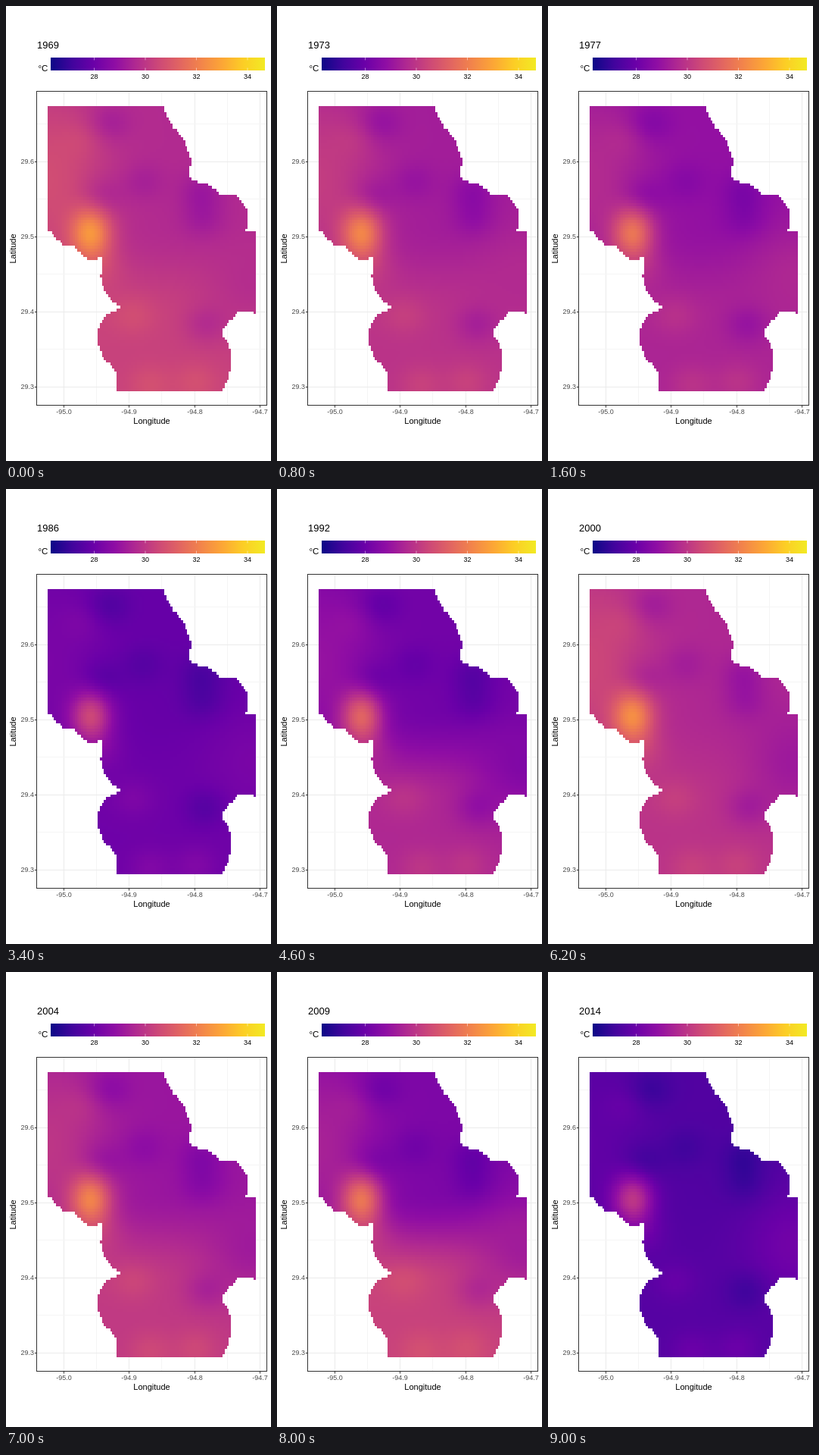
These frames come from a looping animation (350 px wide and 600 px high, 9.2 s). An HTML page with a canvas:

```html
<!DOCTYPE html>
<html>
<head>
<meta charset="utf-8">
<style>
html, body { margin: 0; width: 100%; height: 100%; overflow: hidden; background: #fff; }
canvas { display: block; }
</style>
</head>
<body>
<canvas id="stage" width="350" height="600"></canvas>
<script>
const ctx = document.getElementById('stage').getContext('2d');
const FIRST_YEAR = 1969, YEARS = 46, STEP = 200;
const GRID = 100, MAP = { x: 55, y: 132, w: 275, h: 376 };

const PLASMA = ['0d0887', '41049d', '6a00a8', '8f0da4', 'b12a90', 'cc4778',
  'e16462', 'f2844b', 'fca636', 'fcce25', 'f2ea24']
  .map(hex => [0, 2, 4].map(i => parseInt(hex.slice(i, i + 2), 16)));

const coast = new Path2D(`M55 131H208Q212 150 226 166Q244 188 244 208L241 225 255 233
  270 236 281 247 303 248Q318 262 320 279L317 296H331V405L306 402Q300 412 288 422L285 433
  Q298 450 298 468Q297 488 284 509H146L147 488Q145 478 136 472Q121 458 121 436
  Q122 408 145 402L151 397Q128 386 125 355L126 332 110 335Q101 331 91 317L75 315 55 295Z`);

// Key years: warmth of the north, the east bay and the south
const climate = [
  { year: 1969, north: .40, east: .41, south: .48 },
  { year: 1977, north: .31, east: .39, south: .38 },
  { year: 1986, north: .19, east: .24, south: .21 },
  { year: 1992, north: .22, east: .26, south: .39 },
  { year: 2000, north: .39, east: .34, south: .43 },
  { year: 2009, north: .25, east: .35, south: .48 },
  { year: 2014, north: .14, east: .22, south: .15 }
];

// Lasting warm and cool spots: x, y, strength
const spots = [
  [135, 155, -.06], [103, 175, .03], [180, 232, -.04], [125, 252, -.06],
  [258, 245, -.06], [260, 280, -.05], [128, 345, .04], [168, 408, .04],
  [263, 420, -.06], [190, 500, .05], [250, 497, .05]
];

const lerp = (a, b, f) => a + (b - a) * f;
const gauss = (x, y, cx, cy, rx, ry) =>
  Math.exp(-(((x - cx) / rx) ** 2 + ((y - cy) / ry) ** 2) / 2);
const smoothstep = (a, b, v) => {
  const f = Math.max(0, Math.min(1, (v - a) / (b - a)));
  return f * f * (3 - 2 * f);
};

const cells = [];
for (let i = 0; i < GRID * GRID; i++) {
  const x = MAP.x + (i % GRID + .5) * MAP.w / GRID;
  const y = MAP.y + (Math.floor(i / GRID) + .5) * MAP.h / GRID;
  if (!ctx.isPointInPath(coast, x, y)) continue;
  cells.push({
    i,
    south: smoothstep(290, 410, y),
    west: gauss(x, y, 55, 230, 55, 90),
    east: gauss(x, y, 325, 360, 45, 50),
    hot: gauss(x, y, 112, 300, 19, 24),
    local: spots.reduce((sum, [sx, sy, s]) => sum + s * gauss(x, y, sx, sy, 20, 18), 0)
  });
}

function plasma(v) {
  const p = Math.max(0, Math.min(.9999, v)) * 10, k = Math.floor(p);
  return PLASMA[k].map((c, j) => lerp(c, PLASMA[k + 1][j], p - k));
}

function climateAt(year) {
  const k = Math.max(1, climate.findIndex(c => c.year >= year));
  const a = climate[k - 1], b = climate[k];
  const f = (year - a.year) / (b.year - a.year);
  const mix = key => lerp(a[key], b[key], f);
  return { north: mix('north'), east: mix('east'), south: mix('south') };
}

const field = document.createElement('canvas');
field.width = field.height = GRID;
const fieldCtx = field.getContext('2d');
const image = fieldCtx.createImageData(GRID, GRID);

function drawField(year) {
  const { north, east, south } = climateAt(year);
  const hot = .28 + .3 * (south - north);
  for (const c of cells) {
    const base = lerp(lerp(north, south, c.south), east, c.east);
    const v = base + .25 * south * c.west + hot * c.hot + c.local;
    image.data.set([...plasma(v), 255], c.i * 4);
  }
  fieldCtx.putImageData(image, 0, 0);
  ctx.imageSmoothingEnabled = false;
  ctx.drawImage(field, MAP.x, MAP.y, MAP.w, MAP.h);
}

function text(str, x, y, size, align = 'center', color = '#000') {
  ctx.font = `${size}px "Liberation Sans", Arial, sans-serif`;
  ctx.textAlign = align;
  ctx.fillStyle = color;
  ctx.fillText(str, x, y);
}

function rect(x, y, w, h, color) {
  ctx.fillStyle = color;
  ctx.fillRect(x, y, w, h);
}

function drawLegend() {
  const ramp = ctx.createLinearGradient(59, 0, 342, 0);
  PLASMA.forEach((c, i) => ramp.addColorStop(i / 10, `rgb(${c})`));
  rect(59, 68, 283, 17, ramp);
  text('°C', 42.5, 86, 11.5, 'left');
  for (let i = 0; i < 4; i++) {
    const x = 116.5 + i * 67.5;
    rect(x - .25, 68, .5, 3.4, '#fff');
    rect(x - .25, 81.6, .5, 3.4, '#fff');
    text(28 + 2 * i, x, 96, 9);
  }
}

function drawGrid() {
  for (let i = 0; i < 7; i++) {
    rect(Math.round(76 + i * 43.15), 113, 1, 413, i % 2 ? '#f5f5f5' : '#ebebeb');
  }
  for (let i = 0; i < 8; i++) {
    rect(41, Math.round(155 + i * 49.5), 303, 1, i % 2 ? '#ebebeb' : '#f5f5f5');
  }
}

function drawAxes() {
  ctx.strokeStyle = '#333';
  ctx.strokeRect(40.5, 112.5, 304, 414);
  for (let i = 0; i < 4; i++) {
    const x = Math.round(76 + i * 86.3), y = Math.round(204.5 + i * 99);
    rect(x, 527, 1, 2.5, '#333');
    rect(38, y, 3, 1, '#333');
    text((-95 + i / 10).toFixed(1), x + .5, 538, 9, 'center', '#4d4d4d');
    text((29.6 - i / 10).toFixed(1), 37, y + 3, 9, 'right', '#4d4d4d');
  }
  text('Longitude', 192.5, 551, 11);
  ctx.save();
  ctx.translate(13, 320);
  ctx.rotate(-Math.PI / 2);
  text('Latitude', 0, 0, 11);
  ctx.restore();
}

let shown;
function frame() {
  const year = FIRST_YEAR + Math.floor(performance.now() / STEP) % YEARS;
  if (year !== shown) {
    shown = year;
    rect(0, 0, 350, 600, '#fff');
    text(year, 41, 56, 13, 'left');
    drawLegend();
    drawGrid();
    drawField(year);
    drawAxes();
  }
  requestAnimationFrame(frame);
}
frame();
</script>
</body>
</html>
```
